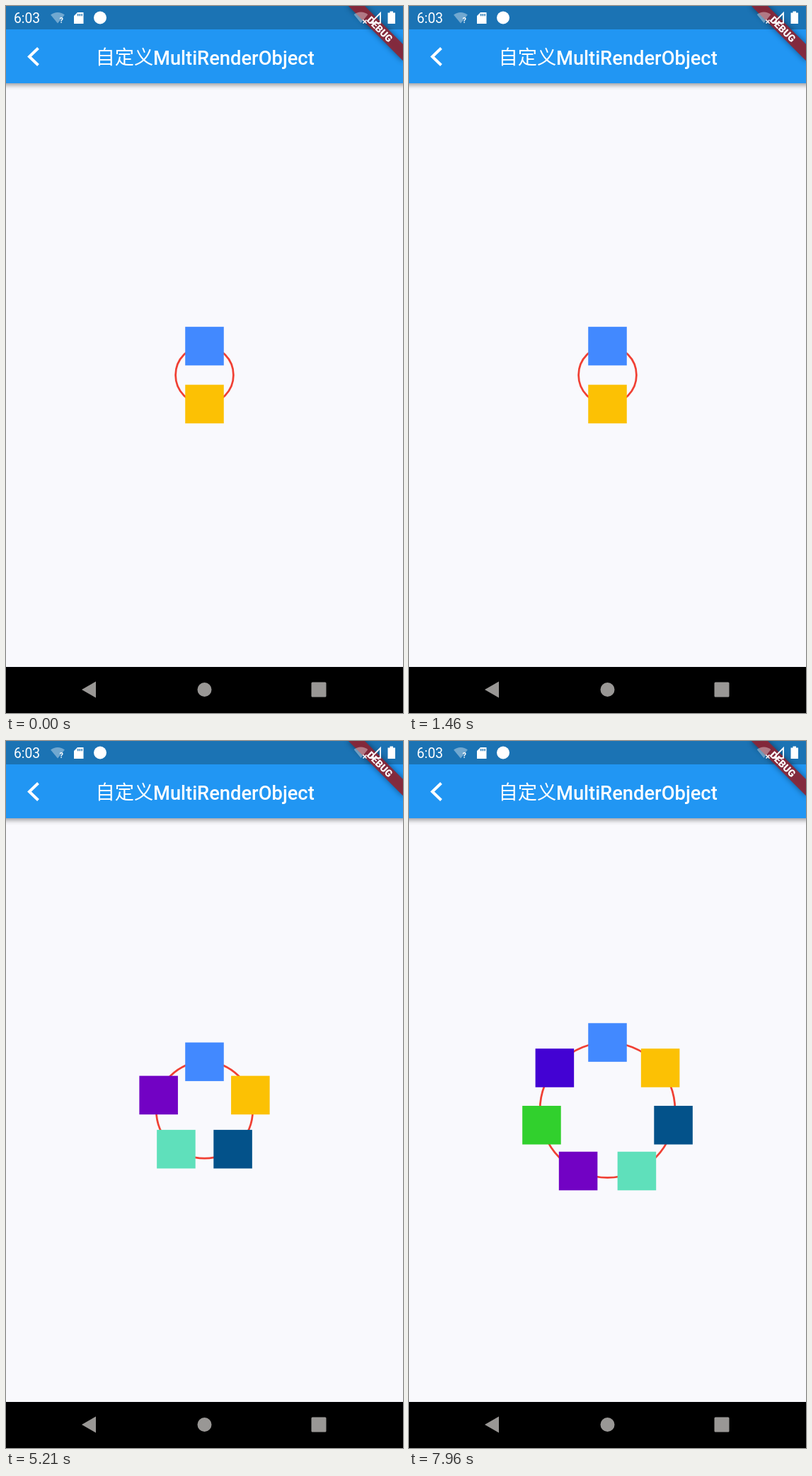
These frames come from a looping animation (561x998 px, 8000 ms). An HTML page with a canvas:

```html
<!DOCTYPE html>
<html lang="zh">
<head>
<meta charset="utf-8">
<title>Ring layout</title>
<style>
html, body { margin: 0; width: 100%; height: 100%; overflow: hidden; background: #f9f9fd; }
canvas { display: block; }
</style>
</head>
<body>
<canvas id="stage" width="561" height="998"></canvas>
<script>
const ctx = document.getElementById('stage').getContext('2d');
const W = 561, H = 998, LOOP = 8000;
const DP = 561 / 411.4;
const CENTER = { x: 280.5, y: 521 };
const COLORS = ['#4289ff', '#fcc104', '#03528a', '#5fe0bb', '#7202c4', '#31d02d', '#4302d3'];
const FIRST_ADD = 2630, ADD_EVERY = 1000;

function rect(x, y, w, h, color) {
  ctx.fillStyle = color;
  ctx.fillRect(x, y, w, h);
}

function trace(points, closed) {
  ctx.beginPath();
  points.forEach(([x, y]) => ctx.lineTo(x, y));
  if (closed) ctx.closePath();
}

function polygon(points, color) {
  trace(points, true);
  ctx.fillStyle = color;
  ctx.fill();
}

function line(points, color, width, closed) {
  trace(points, closed);
  ctx.strokeStyle = color;
  ctx.lineWidth = width;
  ctx.stroke();
}

function disc(x, y, r, color) {
  ctx.beginPath();
  ctx.arc(x, y, r, 0, Math.PI * 2);
  ctx.fillStyle = color;
  ctx.fill();
}

function text(str, x, y, font, align = 'left') {
  ctx.font = font;
  ctx.textAlign = align;
  ctx.fillStyle = '#fff';
  ctx.fillText(str, x, y);
}

function withShadow(blur, dy, color, draw) {
  ctx.save();
  ctx.shadowBlur = blur;
  ctx.shadowOffsetY = dy;
  ctx.shadowColor = color;
  draw();
  ctx.restore();
}

function wifi(x, y) {
  ctx.beginPath();
  ctx.moveTo(x, y);
  ctx.arc(x, y, 15.5, -Math.PI * 0.72, -Math.PI * 0.28);
  ctx.closePath();
  ctx.fillStyle = 'rgba(255,255,255,.38)';
  ctx.fill();
}

function drawAppBar() {
  withShadow(7, 2.5, 'rgba(0,0,0,.42)', () => rect(-10, 0, W + 20, 109, '#2196f3'));
  rect(0, 0, W, 33, '#1b73b4');
  line([[45.5, 59.5], [33, 71.5], [45.5, 83.5]], '#fff', 4);
  text('自定义', 126.5, 82, '27.3px "Noto Sans CJK SC", "Noto Sans CJK", sans-serif');
  text('MultiRenderObject', 208, 82.5, '500 27.3px Roboto, sans-serif');
}

function drawBanner() {
  const offset = 40 * DP, height = 12 * DP;
  ctx.save();
  ctx.translate(W, 0);
  ctx.rotate(Math.PI / 4);
  withShadow(8, 0, 'rgba(0,0,0,.5)', () =>
    rect(-offset, offset - height, offset * 2, height, 'rgba(140,38,55,.92)'));
  text('DEBUG', 0, offset - height / 2 + 5, '900 13.9px Roboto, sans-serif', 'center');
  ctx.restore();
}

function drawStatusIcons() {
  text('6:03', 11, 24, '19.3px Roboto, sans-serif');
  wifi(73, 24.5);
  text('?', 75.5, 23.5, 'bold 11px Roboto, sans-serif');
  polygon([[101, 9], [109.5, 9], [109.5, 25], [96, 25], [96, 14]], '#fff');
  for (let i = 0; i < 3; i++) rect(101 + i * 2.7, 11, 1.4, 3.2, '#1b73b4');
  disc(133, 16.5, 9, '#fff');

  wifi(501.5, 24);
  line([[504.5, 19.5], [509.5, 24.5]], '#fff', 1.6);
  line([[509.5, 19.5], [504.5, 24.5]], '#fff', 1.6);
  line([[529, 10], [529, 24], [515, 24]], '#fff', 1.8, true);
  polygon([[519.5, 19.5], [519.5, 24], [515, 24]], '#fff');
  rect(539.5, 9.5, 10.5, 15.5, '#fff');
  rect(542.5, 7.5, 4.5, 2.5, '#fff');
}

function drawNavBar() {
  const gray = '#999795';
  rect(0, 933, W, H - 933, '#000');
  polygon([[107, 965], [127, 953.5], [127, 976.5]], gray);
  disc(280.5, 965, 10, gray);
  ctx.beginPath();
  ctx.roundRect(431.5, 954.5, 21, 21, 1.5);
  ctx.fillStyle = gray;
  ctx.fill();
}

function drawRing(count) {
  const radius = Math.max(30, count * 10) * DP;
  const size = 40 * DP;
  ctx.beginPath();
  ctx.arc(CENTER.x, CENTER.y, radius, 0, Math.PI * 2);
  ctx.strokeStyle = '#f04034';
  ctx.lineWidth = 2 * DP;
  ctx.stroke();
  for (let i = 0; i < count; i++) {
    const angle = i / count * Math.PI * 2;
    const x = CENTER.x + radius * Math.sin(angle);
    const y = CENTER.y - radius * Math.cos(angle);
    rect(x - size / 2, y - size / 2, size, size, COLORS[i]);
  }
}

function childCount(t) {
  if (t < FIRST_ADD) return 2;
  return Math.min(COLORS.length, 3 + Math.floor((t - FIRST_ADD) / ADD_EVERY));
}

function draw(t) {
  rect(0, 0, W, H, '#f9f9fd');
  drawAppBar();
  drawRing(childCount(t));
  drawBanner();
  drawStatusIcons();
  drawNavBar();
}

const start = performance.now();
function frame() {
  draw((performance.now() - start) % LOOP);
  requestAnimationFrame(frame);
}
frame();
</script>
</body>
</html>
```
